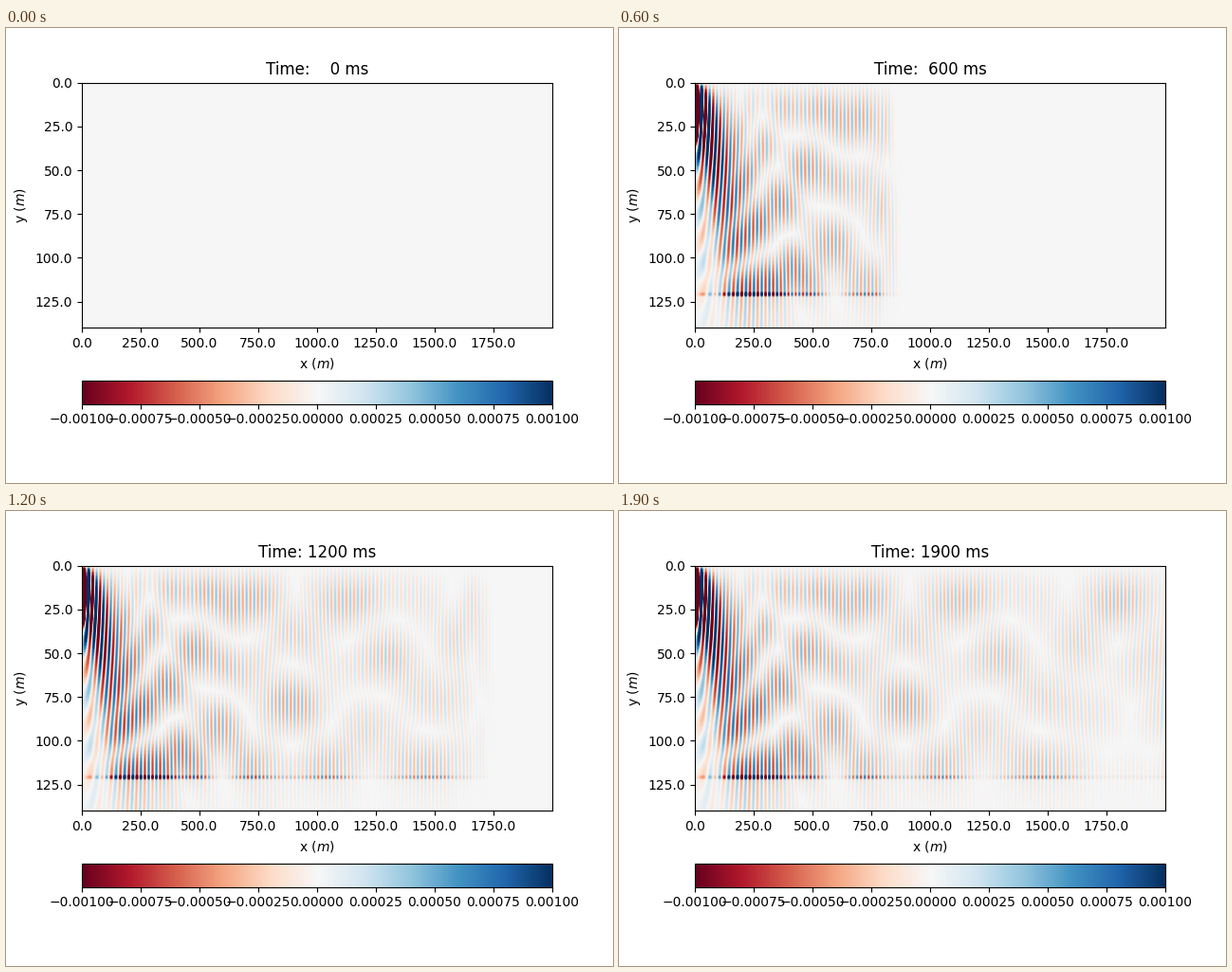
Write a matplotlib script that moves like this. It is 640 by 480 pixels and loops after 1.95 s.

```python
import numpy as np
import matplotlib.pyplot as plt
from matplotlib.animation import FuncAnimation

# Axisymmetric acoustic waveguide: 120 m of water over a faster sediment,
# driven by a 50 Hz point source and solved on a staggered grid.
H = 2.0                      # cell size, m
NX, NZ = 1060, 120           # cells, including the absorbing margin
VIEW_X, VIEW_Z = 2000, 140   # visible part, m
SEABED = 60                  # first sediment row
C_WATER, C_BED, RHO_BED = 1507.0, 1730.0, 1.8
OMEGA = 2 * np.pi * 50
AMP = 0.07
SRC_ROWS = slice(8, 10)      # 18 m deep

TICK = 1 / 60                # s between possible snapshots
SUB = 24                     # solver steps per tick
DT = TICK / SUB
FRAMES = 39
TICKS = [3 * i + (i == 33) for i in range(FRAMES)]


def margin(n, inner):
    depth = np.clip((np.arange(n) - inner) / (n - inner), 0, 1)
    return np.exp(-0.12 * depth ** 2)


def simulate():
    f32 = np.float32
    rows = np.arange(NZ)[:, None]
    rho = np.where(rows < SEABED, 1.0, RHO_BED)
    c = np.where(rows < SEABED, C_WATER, C_BED)
    bulk = rho * c ** 2 * DT / H
    r_mid = (np.arange(NX) + 0.5) * H
    r_face = np.arange(NX + 1) * H

    k_flux = (DT / H / rho * r_face[1:-1]).astype(f32)
    k_vz = (DT / H * 2 / (rho[1:] + rho[:-1])).astype(f32)
    k_r = (bulk / r_mid).astype(f32)
    k_z = bulk.astype(f32)
    damp = np.outer(margin(NZ, VIEW_Z // 2), margin(NX, VIEW_X // 2)).astype(f32)

    p = np.zeros((NZ, NX), f32)
    flux = np.zeros((NZ, NX + 1), f32)      # radius times radial velocity
    vz = np.zeros((NZ + 1, NX), f32)
    push = DT * C_WATER ** 2 * 4 * AMP / H ** 3 / OMEGA / 2

    nz, nx = VIEW_Z // 2, VIEW_X // 2
    gain = np.full((nz, 1), C_WATER)
    gain[SEABED] *= 4                       # bright interface row

    wanted = set(TICKS)
    shots = {}
    for step in range(max(TICKS) * SUB + 1):
        if step % SUB == 0 and step // SUB in wanted:
            v = flux[:nz, 1:nx + 1] / r_face[1:nx + 1]
            v[:, 1:] = (v[:, 1:] + v[:, :-1]) / 2
            shots[step // SUB] = v * gain
        flux[:, 1:-1] -= k_flux * (p[:, 1:] - p[:, :-1])
        vz[1:-1] -= k_vz * (p[1:] - p[:-1])
        vz[0] -= 2 * DT / H * p[0]          # pressure-free surface
        p -= k_r * (flux[:, 1:] - flux[:, :-1])
        p -= k_z * (vz[1:] - vz[:-1])
        t = (step + 0.5) * DT
        ramp = min(t / 0.03, 1)
        ramp *= ramp * (3 - 2 * ramp)
        p[SRC_ROWS, 0] += push * ramp * np.sin(OMEGA * t)
        p *= damp
    return [shots[n] for n in TICKS]


fields = simulate()

plt.rcParams["font.family"] = "DejaVu Sans"
fig, ax = plt.subplots(figsize=(6.4, 4.8), dpi=100)
im = ax.imshow(fields[0], cmap="RdBu", vmin=-1e-3, vmax=1e-3, aspect="auto",
               extent=(0, VIEW_X, VIEW_Z, 0))
xt = np.arange(0, VIEW_X, 250.0)
yt = np.arange(0, VIEW_Z, 25.0)
ax.set_xticks(xt, [f"{v:.1f}" for v in xt])
ax.set_yticks(yt, [f"{v:.1f}" for v in yt])
ax.set_xlabel("x ($m$)")
ax.set_ylabel("y ($m$)")
title = ax.set_title("")
fig.colorbar(im, ax=ax, orientation="horizontal")


def draw(i):
    im.set_data(fields[i])
    title.set_text(f"Time: {round(TICKS[i] * TICK * 1000):4d} ms")
    return im, title


anim = FuncAnimation(fig, draw, frames=FRAMES, interval=50, repeat=True,
                     repeat_delay=0)
plt.show()
```
